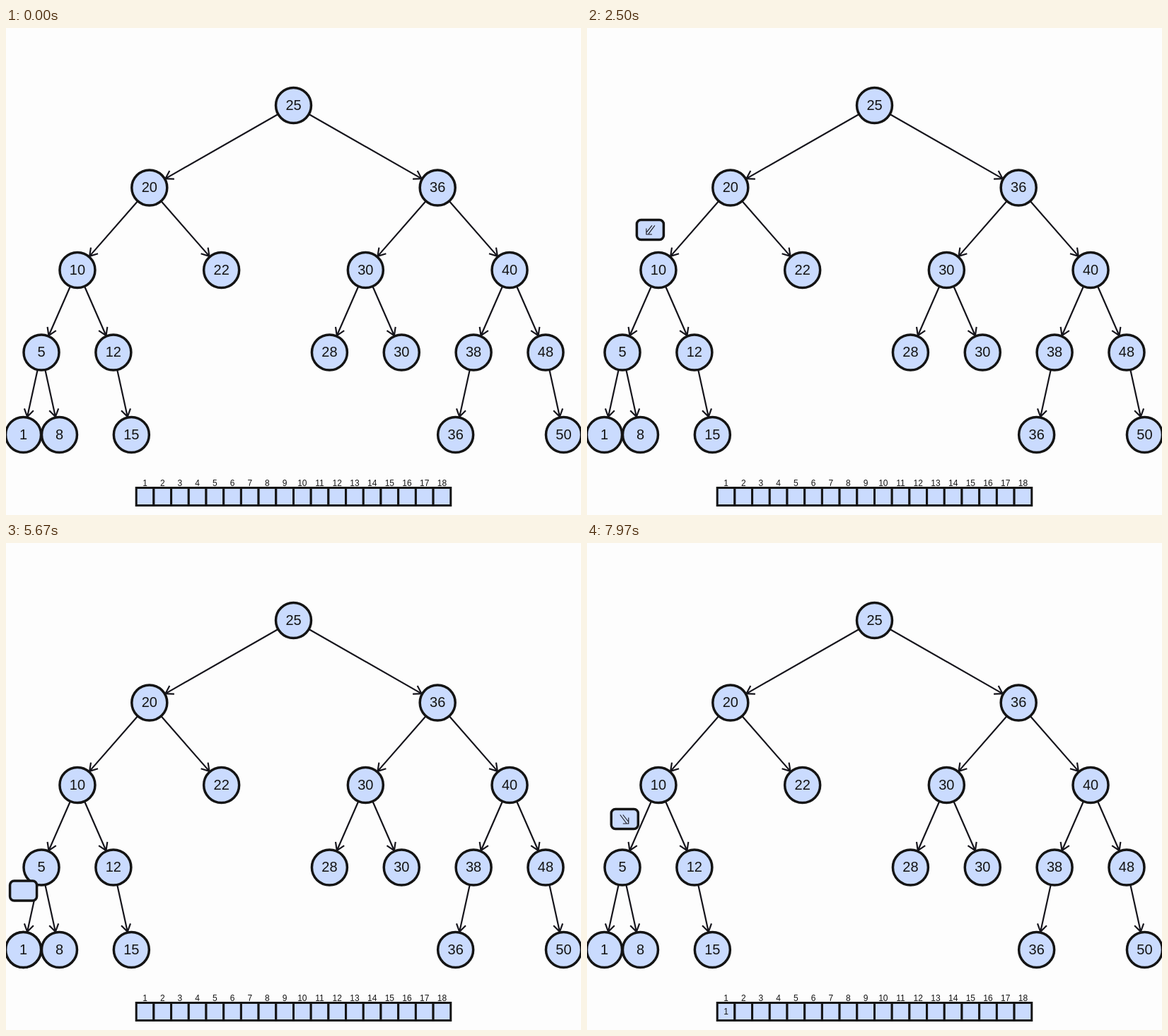
Write an HTML page that moves like this. It is 813x689 px and loops after 8000 ms.

```html
<!DOCTYPE html>
<html lang="en">
<head>
<meta charset="utf-8">
<title>Postorder traversal</title>
<style>
  html, body { margin: 0; width: 100%; height: 100%; overflow: hidden; background: #fdfdfd; }
  svg { display: block; width: 813px; height: 689px; }
  circle, rect { fill: #cadbfe; stroke: #141414; stroke-width: 3.5; }
  path { fill: none; stroke: #16151c; stroke-width: 2.2; }
  text { font: 20px "Liberation Sans", Arial, sans-serif; fill: #141414; text-anchor: middle; }
  .small { font-size: 12px; }
  #arrow { stroke-width: 1.1; }
</style>
</head>
<body>
<svg viewBox="0 0 813 689">
  <g id="edges"></g>
  <g id="nodes"></g>
  <g id="cells"></g>
  <text id="stored" class="small" x="196.6" y="667">1</text>
  <g id="copy"><circle r="25"/><text y="6.3">1</text></g>
  <g id="cursor">
    <rect x="-19" y="-14" width="38" height="28" rx="6"/>
    <path id="arrow" d="M-5.5 -2V6.5H2.5M2.5 -6L-5 3.5M6.5 -6L-2.5 6"/>
  </g>
</svg>
<script>
const LOOP = 8000, CENTER = 406.5, TOP = 109.5, LEVEL = 116.5, SPREAD = 203.7, RADIUS = 25;
const el = id => document.getElementById(id);

// Each node is [value, left, right].
const tree = [25,
  [20, [10, [5, [1], [8]], [12, null, [15]]], [22]],
  [36, [30, [28], [30]], [40, [38, [36]], [48, null, [50]]]]];

let edges = '', nodes = '', cells = '';

function addEdge(x1, y1, x2, y2) {
  const angle = Math.atan2(y2 - y1, x2 - x1);
  const point = (x, y, a, r) => (x + r * Math.cos(a)).toFixed(1) + ' ' + (y + r * Math.sin(a)).toFixed(1);
  const barb = turn => point(x2 - 26 * Math.cos(angle), y2 - 26 * Math.sin(angle), angle + Math.PI + turn, 12.5);
  const tip = point(x2, y2, angle, -26);
  edges += `<path d="M${x1} ${y1}L${tip}M${barb(-0.56)}L${tip}L${barb(0.56)}"/>`;
}

function addNode([value, ...children], x, y, spread) {
  nodes += `<circle cx="${x}" cy="${y}" r="${RADIUS}"/><text x="${x}" y="${y + 6.3}">${value}</text>`;
  children.forEach((child, side) => {
    if (!child) return;
    const childX = x + (side ? spread : -spread), childY = y + LEVEL;
    addEdge(x, y, childX, childY);
    addNode(child, childX, childY, spread / 2);
  });
}
addNode(tree, CENTER, TOP, SPREAD);

const CELL = 24.7, FIRST = CENTER - 9 * CELL;
for (let i = 0; i < 18; i++) {
  const x = FIRST + i * CELL;
  cells += `<rect x="${x}" y="650.5" width="${CELL}" height="25" style="stroke-width:3"/>` +
    `<text class="small" x="${x + CELL / 2}" y="648">${i + 1}</text>`;
}
el('edges').innerHTML = edges;
el('nodes').innerHTML = nodes;
el('cells').innerHTML = cells;

// Cursor stops above the nodes on the leftmost path, root first.
const stops = [0, 1, 2, 3, 4].map(depth =>
  [CENTER - 2 * SPREAD * (1 - 2 ** -depth), TOP - 83.5 + LEVEL * depth]);
const rightLeaf = [stops[3][0] + SPREAD / 8, stops[4][1]];

// [start, end, from, to]
const cursorMoves = [
  [930, 1300, stops[0], stops[1]],
  [1740, 2070, stops[1], stops[2]],
  [2460, 2720, stops[2], stops[3]],
  [3075, 3340, stops[3], stops[4]],
  [7270, 7510, stops[4], stops[3]],
  [7948, 8210, stops[3], rightLeaf]];
const copyMoves = [[5700, 6342, [stops[4][0], TOP + 4 * LEVEL], [CENTER, 611.5]]];

function position(moves, t) {
  const [start, end, from, to] = moves.filter(m => t >= m[0]).pop() || moves[0];
  const u = Math.min(1, Math.max(0, (t - start) / (end - start)));
  const p = 1 - (1 - u) ** 1.5;
  return from.map((v, i) => v + (to[i] - v) * p);
}

const place = (id, [x, y]) => el(id).setAttribute('transform', `translate(${x} ${y})`);
const show = (id, visible) => el(id).setAttribute('visibility', visible ? 'visible' : 'hidden');

function draw(t) {
  place('cursor', position(cursorMoves, t));
  place('copy', position(copyMoves, t));
  el('cursor').style.display = t >= 430 ? '' : 'none';
  show('arrow', t < 5110 || t >= 7810);
  el('arrow').setAttribute('transform', t < 4140 ? '' : 'scale(-1 1)');
  show('copy', t >= 5110 && t < 6740);
  show('stored', t >= 6740);
}

const begin = performance.now();
function frame() {
  draw((performance.now() - begin) % LOOP);
  requestAnimationFrame(frame);
}
frame();
</script>
</body>
</html>
```
